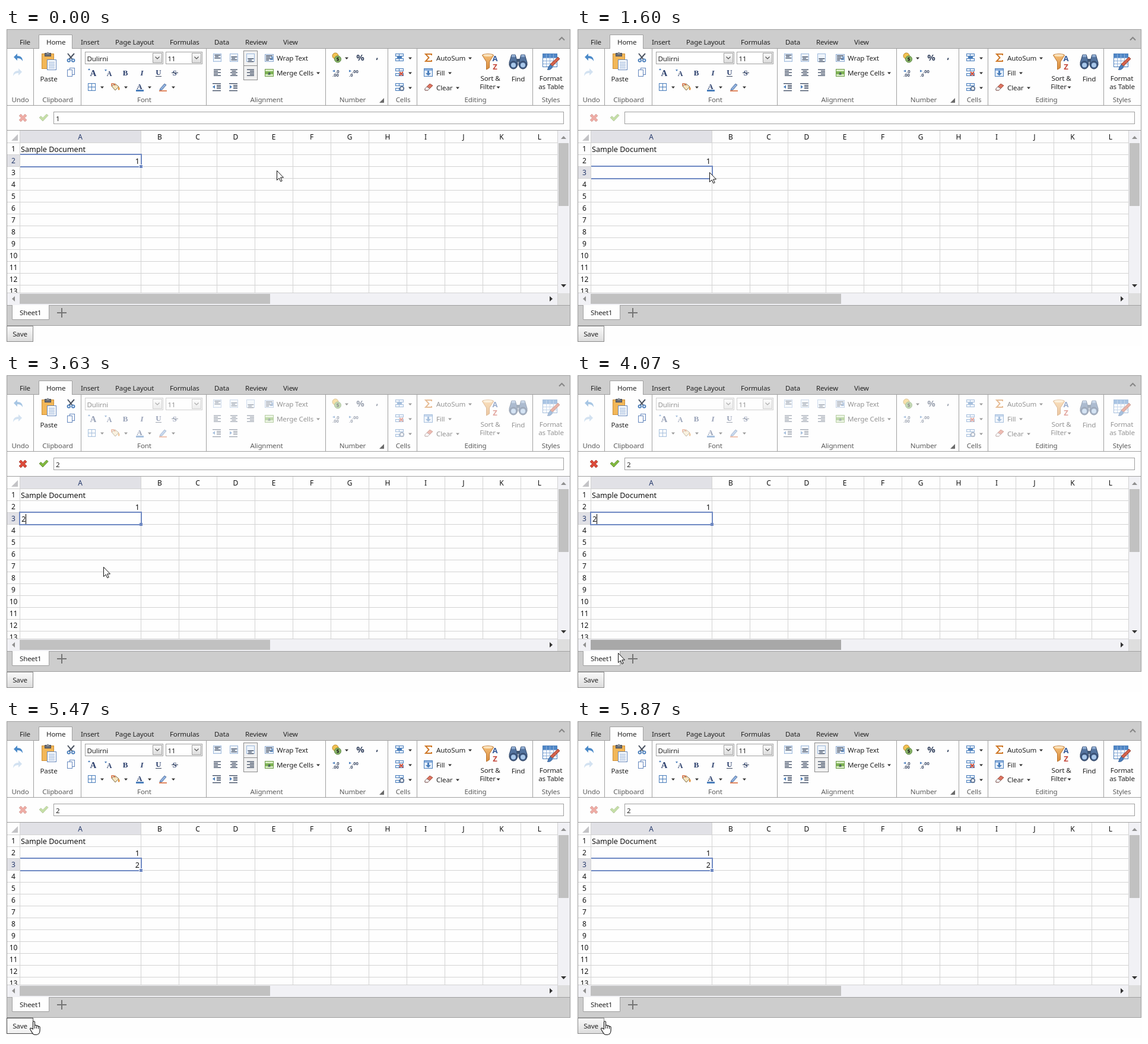
An HTML page that plays this animation: 952x536 px, repeating every 8000 ms.

```html
<!DOCTYPE html>
<html lang="en">
<head>
<meta charset="utf-8">
<title>Spreadsheet</title>
<style>
html, body { margin: 0; width: 100%; height: 100%; overflow: hidden; background: #fefefe; }
svg { display: block; width: 952px; height: 536px; }
text { font-family: "Noto Sans", "Open Sans", sans-serif; font-size: 11.6px; letter-spacing: -.15px; fill: #222; }
.mid { text-anchor: middle; }
.end { text-anchor: end; }
.group { fill: #5c5c5c; }
.cell { font-size: 12.6px; letter-spacing: 0; fill: #111; }
.head { font-size: 12px; letter-spacing: 0; fill: #111; text-anchor: middle; }
.navy { fill: #25396b; }
.serif { font: bold 13px "Liberation Serif", serif; letter-spacing: 0; fill: #2b3f6c; text-anchor: middle; }
.sign { font-size: 15px; font-weight: bold; fill: #35435f; letter-spacing: 0; text-anchor: middle; }
.tiny { font-size: 7.5px; font-weight: bold; fill: #35435f; letter-spacing: 0; }
</style>
</head>
<body>
<svg id="stage" viewBox="0 0 952 536" xmlns="http://www.w3.org/2000/svg"></svg>
<script>
const LINE = '#a0a0a0', BAR = '#cdcdcd', GRID = '#d3d3d3', BLUE = '#4a7ebb', INK = '#39475f', SEL = '#6f89c3';

const text = (x, y, s, cls = '') => `<text x="${x}" y="${y}" class="${cls}">${s}</text>`;
const fillRect = (x, y, w, h, fill) =>
  `<rect x="${x}" y="${y}" width="${w}" height="${h}" fill="${fill}"/>`;
const box = (x, y, w, h, fill = 'none', stroke = LINE) =>
  `<rect x="${x + .5}" y="${y + .5}" width="${w - 1}" height="${h - 1}" fill="${fill}" stroke="${stroke}"/>`;
const hline = (x, y, w, c = LINE) => fillRect(x, y, w, 1, c);
const vline = (x, y, h, c = LINE) => fillRect(x, y, 1, h, c);
const shape = (d, fill, stroke = 'none', w = 1) =>
  `<path d="${d}" fill="${fill}" stroke="${stroke}" stroke-width="${w}"/>`;
const stroke = (d, c, w = 1) => shape(d, 'none', c, w);
const disc = (x, y, r, fill, c = 'none', w = 1) =>
  `<circle cx="${x}" cy="${y}" r="${r}" fill="${fill}" stroke="${c}" stroke-width="${w}"/>`;
const drop = (x, y) => shape(`M${x - 3} ${y - 1.5}h6l-3 3.5z`, '#333');
const group = (id, body) => `<g id="${id}">${body}</g>`;
const range = (n, fn) => Array.from({ length: n }, (_, i) => fn(i)).join('');

// Ribbon pieces
function tabs() {
  const names = [[23, 'File'], [68, 'Home'], [126, 'Insert'], [184, 'Page Layout'], [276, 'Formulas'],
    [351, 'Data'], [403, 'Review'], [467, 'View']];
  return box(1, 2, 950, 500, '#fefefe') + fillRect(2, 3, 948, 31, BAR) + hline(2, 34, 948) +
    shape('M55.5 35V11.5H111.5V35', '#fefefe', LINE) + fillRect(56, 34, 55, 2, '#fefefe') +
    names.map(([x, s]) => text(x, 28, s)).join('') +
    stroke('M932 20.5l4.5-4.5 4.5 4.5', '#858585', 2);
}

function groups() {
  const labels = [[24, 'Undo'], [87, 'Clipboard'], [233, 'Font'], [439, 'Alignment'], [584, 'Number'],
    [669, 'Cells'], [791, 'Editing'], [918, 'Styles']];
  return labels.map(([x, s]) => text(x, 125, s, 'mid group')).join('') +
    [47, 127, 338, 539, 644, 693, 888].map(x => vline(x - 1, 35, 95)).join('') +
    hline(2, 130, 948) + shape('M637 118v8h-8z', '#6a6a6a');
}

function clipboard() {
  return box(60, 43, 21, 26, '#f2b758', '#cd8f37') + box(65, 42, 11, 6, '#686d76', '#4c5058') +
    disc(70.5, 42.5, 2, '#8d929a') + box(69, 53, 16, 18, '#fff', '#6487bd') +
    range(5, i => hline(72, 57 + i * 2.5, 10, '#8cabd6')) +
    text(72, 90, 'Paste', 'mid') +
    stroke('M104 43l8 10M115 43l-9 10', '#4b5361', 2) +
    disc(105.8, 54.6, 2.3, 'none', BLUE, 1.8) + disc(113.2, 54.6, 2.3, 'none', BLUE, 1.8) +
    box(107, 67, 9, 12, '#fff', '#6487bd') + box(103, 70, 9, 12, '#fff', '#6487bd');
}

function combo(x, w, s) {
  const b = x + w - 18;
  return box(x, 40, w, 21, '#fff') + text(x + 3.5, 56, s) +
    box(b, 42, 16, 17, 'url(#btn)') + stroke(`M${b + 4.5} 48.5l3.5 3.5 3.5-3.5`, '#555', 1.2);
}

function fontTools() {
  return combo(133, 132, 'Dulirni') + combo(269, 62, '11') +
    text(147, 81, '<tspan font-size="15">A</tspan>', 'serif') + shape('M138 71h4l-2-3z', BLUE) +
    text(174, 81, '<tspan font-size="12">A</tspan>', 'serif') + shape('M166 70h4l-2 3z', BLUE) +
    text(201, 80, 'B', 'serif') + text(229, 80, '<tspan font-style="italic">I</tspan>', 'serif') +
    text(257, 79, 'U', 'serif') + hline(252, 81, 10, INK) +
    text(284, 80, 'S', 'serif') + hline(279, 75, 11, INK) +
    box(138, 93, 13, 13, '#fff', BLUE) + vline(144, 94, 11, BLUE) + hline(139, 99, 11, BLUE) +
    shape('M178 98l6-4 6 5-6 6z', '#f7e6c0', '#7b6a48') + stroke('M178 98v-4h4l2 3', '#d36a3a', 1.5) +
    shape('M190 99c2 2 2 5 0 6-2-2-1-4 0-6z', '#e08a2d') +
    text(225, 103, 'A', 'serif') + fillRect(219, 104, 13, 3, BLUE) +
    shape('M260 102l7-8 3 2-7 8-4 1z', '#8fb2e0', '#536f9c') + fillRect(258, 105, 13, 2, '#e2875f') +
    [162, 202, 242, 282].map(x => drop(x, 100)).join('');
}

const lines = (x, y, widths, anchor, c = INK) => widths.map((w, i) =>
  fillRect(x + (12 - w) * anchor, y + i * 2.5, w, 1.3, c)).join('');

const indent = (x, dir) => lines(x, 93, [14], 0) + lines(x, 105, [14], 0) +
  lines(x + 7, 96, [7, 7, 7], 0) +
  shape(dir < 0 ? `M${x} 99.3l4-3v6z` : `M${x + 5} 99.3l-4-3v6z`, BLUE);

function alignTools() {
  return range(3, i => box(349 + i * 28, 43, 14, 14, '#eef4fb', '#9db9dc') +
      lines(351 + i * 28, 45 + i * 3, [10, 6, 10], .2)) +
    range(3, i => lines(350 + i * 28, 69.5, [12, 7, 12, 7, 12], i / 2)) +
    indent(348, -1) + indent(376, 1) +
    box(436, 44, 15, 13, '#f3f7fc', '#8aa8cf') + lines(438, 46, [11, 7, 11, 5], 0) +
    stroke('M446 49h3v4h-4', BLUE, 1.3) + text(456, 55, 'Wrap Text') +
    box(436, 69, 15, 13, '#d9edc6', '#6d9c4a') + fillRect(437, 73, 13, 5, '#7fb455') +
    text(443.5, 78.5, 'a', 'tiny mid') + text(456, 80, 'Merge Cells') + drop(526, 76);
}

const decimals = (x, top, low, dir) => text(x + 5, 75.5, top, 'tiny') + text(x, 82, low, 'tiny') +
  shape(`M${x + 2 - 2 * dir} 70.5v4l${4 * dir}-2z`, BLUE);

function numberTools() {
  return disc(555, 47, 5, '#f3c353', '#b98a2c') + disc(559, 52.5, 5.5, '#8cb86a', '#55813b') +
    text(559, 56, '<tspan font-size="9" font-weight="bold">$</tspan>', 'mid') + drop(574, 51) +
    text(597, 55, '%', 'sign') + text(625.5, 52, ',', 'sign') +
    decimals(550, '.0', '.00', -1) + decimals(578, '.00', '.0', 1);
}

const cellIcon = y => box(656, y, 14, 5, '#e6effa', BLUE) + box(656, y + 8, 14, 5, '#e6effa', BLUE) +
  vline(662, y, 5, BLUE) + vline(662, y + 8, 5, BLUE) + drop(681, y + 8);

function cellTools() {
  return [43, 68, 93].map(cellIcon).join('') + fillRect(659, 48, 8, 3, BLUE) +
    stroke('M663 74l6 6m0-6l-6 6', '#d0503c', 2) + disc(667, 102, 3.2, '#fff', '#667a98', 2);
}

function editTools() {
  return stroke('M717 46v-2h-10l5.5 6-5.5 6h10v-2', '#cf7a2b', 2) + text(725, 55, 'AutoSum') + drop(782, 51) +
    box(704, 68, 15, 14, '#e6effa', BLUE) + fillRect(705, 69, 13, 3, '#8cb0de') +
    shape('M710 72h3v4h3l-4.5 4.5-4.5-4.5h3z', BLUE) + text(725, 80, 'Fill') + drop(748, 76) +
    shape('M706 102l8-8 5 3-8 8h-5z', '#dd7461', '#a3503f') + shape('M706 102l3-3 5 3-3 3h-5z', '#f4eeee', '#8a7777') +
    text(725, 105, 'Clear') + drop(761, 101) +
    shape('M802.5 46c0-3 19-3 19 0l-7 11v10l-5 3v-13z', 'url(#funnel)', '#b8722f') +
    `<ellipse cx="812" cy="46" rx="8" ry="2" fill="#fbe3bd"/>` +
    text(824, 56, '<tspan font-size="13" font-weight="bold" fill="#355a99">A</tspan>', 'mid') +
    text(824, 70, '<tspan font-size="13" font-weight="bold" fill="#c4473a">Z</tspan>', 'mid') +
    text(816, 89, 'Sort &amp;', 'mid') + text(811.5, 103, 'Filter', 'mid') + drop(829.5, 100) +
    [0, 1].map(i => {
      const x = i ? 871 : 855;
      return shape(`M${x - 3} 45h6l4 13v5h-14v-5z`, '#54749f', '#34496b') +
        fillRect(x - 3, 45, 6, 4, '#8ca9cf') + disc(x, 62.5, 6.5, '#3f5a83', '#2f425f') + disc(x, 62.5, 4, '#a9c8ea');
    }).join('') + fillRect(860, 52, 6, 5, '#405674') +
    text(863, 90, 'Find', 'mid');
}

function styleTools() {
  return box(904, 43, 25, 23, '#fff', BLUE) + fillRect(905, 44, 23, 6, '#4f86c6') +
    range(3, i => hline(905, 50 + i * 5, 23, '#8eb0da')) + range(3, i => vline(910 + i * 6, 44, 21, '#8eb0da')) +
    shape('M917 61l13-12 3 3-12 12z', '#d3624b', '#974131') + shape('M912 70c2-1 1-5 5-8l4 3c-1 4-5 6-9 5z', BLUE, '#345d94') +
    text(918, 89, 'Format', 'mid') + text(918.5, 103, 'as Table', 'mid');
}

const undoPath = 'M13 49l6-6v4c6 0 9 3 9 9-2-4-5-5-9-5v4z';
const redoPath = 'M27 74l-6-6v4c-6 0-9 3-9 9 2-4 5-5 9-5v4z';

function formulaBar() {
  return hline(2, 172, 948) + box(80, 141, 860, 21, '#fff') +
    group('marks',
      shape('M22 148l3-3 3.5 3.5 3.5-3.5 3 3-3.5 3.5 3.5 3.5-3 3-3.5-3.5-3.5 3.5-3-3 3.5-3.5z', '#dc4a3a', '#a33a2f', .8) +
      shape('M56 151l3-2.5 3 3 6.5-6.5 2.5 2.5-9 9.5z', '#82ba3d', '#55802b', .8)) +
    text(84, 157, '', 'formula');
}

function sheet() {
  const cols = 'BCDEFGHIJKL';
  return `<g clip-path="url(#gridClip)">` +
    fillRect(24, 173, 203, 20, '#e1e1e6') + fillRect(2, 214, 21, 19, '#e1e1e6').replace('<rect', '<rect id="rowMark"') +
    range(14, i => hline(2, 193 + i * 20, 927, GRID)) +
    vline(23, 173, 273, GRID) + range(11, i => vline(227 + i * 64, 173, 273, GRID)) +
    shape('M20 179v11h-11z', '#c3c3c6') + text(125, 188, 'A', 'head navy') +
    range(11, i => text(259 + i * 64, 188, cols[i], 'head')) +
    range(13, i => text(12.5, 208 + i * 20, i + 1, 'head row')) +
    text(25, 209, 'Sample Document', 'cell') + text(225, 229, '1', 'cell end') +
    group('value', text(225, 249, '2', 'cell end')) +
    group('select', `<g clip-path="url(#cellClip)"><rect x="23" y="213" width="205" height="21" fill="none" stroke="${SEL}" stroke-width="2"/></g>` +
      box(224, 230, 7, 7, SEL, '#fff')) +
    group('editor', `<rect x="23" y="233" width="205" height="21" fill="#fff" stroke="${SEL}" stroke-width="2"/>` +
      fillRect(225, 251, 5, 5, SEL) + text(26, 249, '2', 'cell') + group('caret', vline(33, 236, 17, '#000'))) +
    '</g>' +
    fillRect(929, 173, 21, 274, '#f1f1f5') + vline(929, 173, 294, GRID) + fillRect(931, 194, 17, 106, '#c1c1c1') +
    shape('M935 187h9l-4.5-5z', '#909090') + shape('M935 432h9l-4.5 5z', '#333') +
    fillRect(2, 447, 927, 20, '#f1f1f5') + hline(2, 446, 927, GRID) +
    fillRect(23, 448, 422, 17, '#c1c1c1').replace('<rect', '<rect id="thumb"') +
    shape('M15 452v9l-5-4.5z', '#909090') + shape('M916 452v9l5-4.5z', '#333') + fillRect(930, 447, 20, 20, '#dedede') +
    hline(2, 467, 948) + fillRect(2, 468, 948, 33, BAR) +
    shape('M10.5 467V491.5H72.5V467', '#fefefe', LINE) + text(23, 484, 'Sheet1') +
    fillRect(86, 479, 16, 2, '#757575') + fillRect(93, 472, 2, 16, '#757575');
}

const gradient = (id, a, b) => `<linearGradient id="${id}" x2="0" y2="1"><stop stop-color="${a}"/><stop offset="1" stop-color="${b}"/></linearGradient>`;
const clip = (id, x, y, w, h) => `<clipPath id="${id}">${fillRect(x, y, w, h, '#000')}</clipPath>`;

document.getElementById('stage').innerHTML =
  '<defs>' + gradient('btn', '#fafafa', '#dcdcdc') + gradient('hot', '#ffffff', '#f0f0f0') +
  gradient('down', '#cfcfcf', '#e4e4e4') + gradient('funnel', '#f6c27c', '#d98a3a') +
  clip('gridClip', 2, 173, 927, 273) + clip('cellClip', 24, 210, 206, 30) + '</defs>' +
  fillRect(0, 0, 952, 536, '#fefefe') + tabs() +
  group('content', groups() + clipboard() + shape(redoPath, '#d3e2f1') +
    group('pressed', box(400, 38, 24, 26, '#f1f1f1', '#8c8c8c') + box(400, 63, 24, 25, '#f1f1f1', '#8c8c8c')) +
    group('tools', shape(undoPath, '#4b8ac9') + fontTools() + alignTools() + numberTools() + cellTools() + editTools() + styleTools()) +
    formulaBar() + sheet() +
    group('save', box(1, 502, 45, 27, 'url(#btn)', '#8a8a8a') + text(23.5, 520, 'Save', 'mid'))) +
  group('arrow', shape('M.5.5V16.5L4.2 13 6.8 18.7 9.2 17.6 6.6 12H11.5Z', '#fff', '#111')) +
  group('hand', shape('M5.5 14V2.2a1.5 1.5 0 0 1 3 0V8.5c0-1.6 3-1.6 3 0v1c0-1.6 3-1.4 3 .2v.8c0-1.3 2.6-1.3 2.6.4V16c0 4-2 7.5-6 7.5h-2c-3 0-4-1.5-5-3.5L.8 14.5C0 12.5 2 11.5 3.3 13z', '#fff', '#111', 1.1) +
    stroke('M8.5 8v5M11.5 9.5v3.5M14.5 10.5v3', '#111'));

const $ = id => document.getElementById(id);
const show = (id, on) => $(id).setAttribute('display', on ? 'inline' : 'none');
const set = (el, k, v) => el.setAttribute(k, v);
const formula = document.querySelector('.formula');
const rows = document.querySelectorAll('.row');
const saveBox = $('save').querySelector('rect');

// Pointer stops: time, x, y
const path = [[500, 456, 240], [900, 340, 235], [1300, 229, 241], [1370, 223, 243], [3370, 223, 243],
  [3630, 164, 325], [4070, 69, 470], [4170, 57, 489], [4430, 46, 508]];

function pointer(t) {
  let i = path.findIndex(p => p[0] > t);
  if (i === 0) return path[0].slice(1);
  if (i < 0) return path[path.length - 1].slice(1);
  const [t0, x0, y0] = path[i - 1], [t1, x1, y1] = path[i], k = (t - t0) / (t1 - t0);
  return [x0 + (x1 - x0) * k, y0 + (y1 - y0) * k].map(Math.round);
}

function draw(t) {
  const within = (a, b) => t >= a && t < b;
  const editing = within(2500, 5470), barEdit = within(2570, 5470), loading = within(5800, 5870);
  const row = t < 1600 ? 2 : 3, done = t >= 5470;

  show('content', !within(5700, 5800));
  show('pressed', t < 1600 || done);
  set($('tools'), 'opacity', editing ? .48 : 1);
  set($('marks'), 'opacity', barEdit ? 1 : .45);
  formula.textContent = t < 1600 ? '1' : t < 2570 || loading ? '' : '2';

  set($('rowMark'), 'y', 174 + row * 20);
  rows.forEach((r, i) => r.classList.toggle('navy', i + 1 === row));
  show('value', done);
  show('select', !editing && !loading);
  set($('select'), 'transform', `translate(0 ${(row - 2) * 20})`);
  show('editor', editing);
  show('caret', Math.floor((t - 2500) / 532) % 2 === 0 && t < 5130);
  set($('thumb'), 'fill', within(4000, 4100) ? '#a8a8a8' : '#c1c1c1');

  const hand = t >= 4370, hover = hand && t < 5700, down = within(5300, 5470);
  set(saveBox, 'fill', `url(#${down ? 'down' : hover ? 'hot' : 'btn'})`);
  set(saveBox, 'stroke', hover ? '#4a4a4a' : '#8a8a8a');

  const [x, y] = pointer(t);
  show('arrow', !hand);
  show('hand', hand);
  set($('arrow'), 'transform', `translate(${x} ${y})`);
  set($('hand'), 'transform', `translate(${x - 6} ${y - 1})`);
}

const start = performance.now();
function tick() {
  draw((performance.now() - start) % 8000);
  requestAnimationFrame(tick);
}
tick();
</script>
</body>
</html>
```
